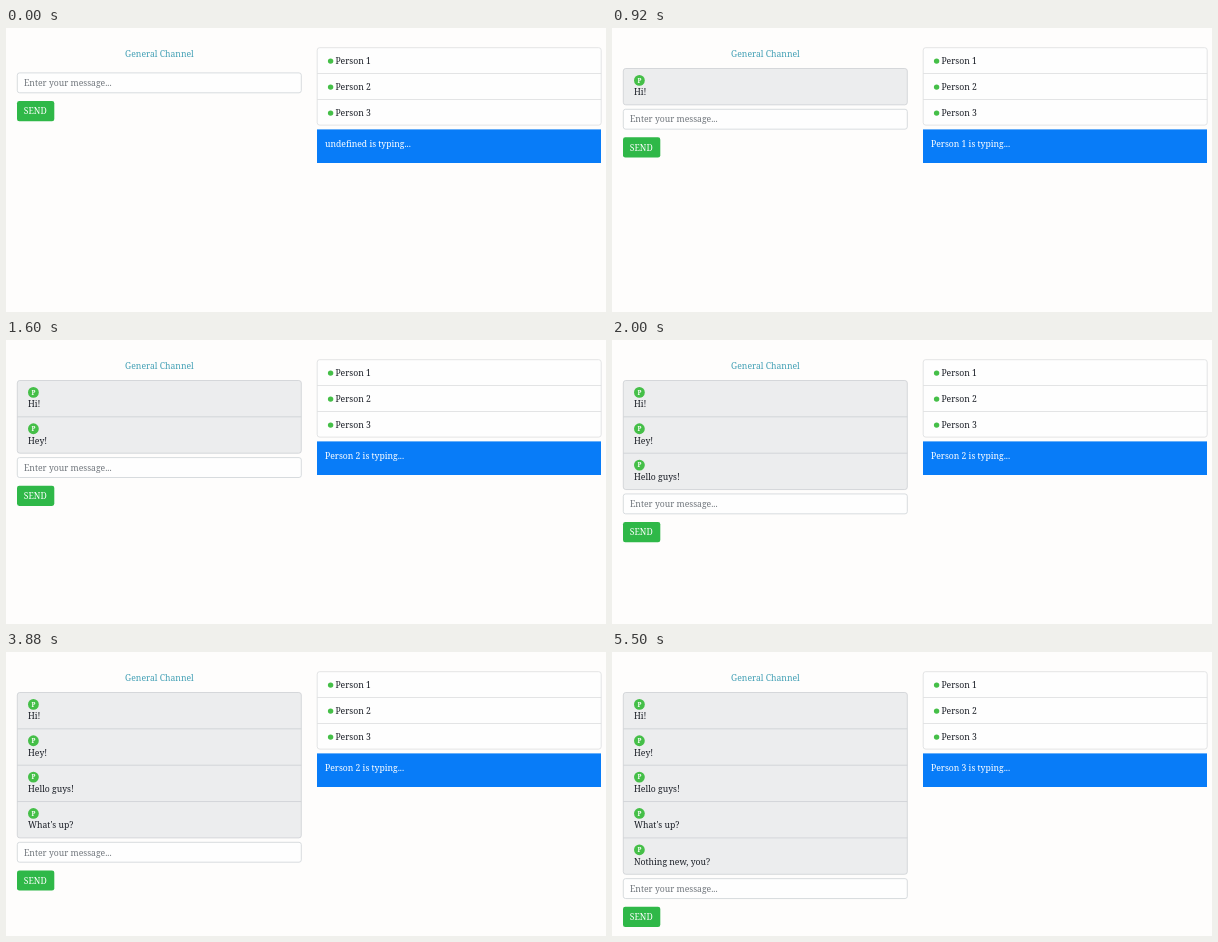
An HTML page with a canvas for the animation above (6000 ms loop, 600 by 284 pixels).

```html
<!DOCTYPE html>
<html lang="en">
<head>
<meta charset="utf-8">
<title>Group chat</title>
<style>
  html, body { margin: 0; width: 100%; height: 100%; overflow: hidden; background: #fefdfc; }
  canvas { display: block; width: 600px; height: 284px; }
</style>
</head>
<body>
<canvas id="stage"></canvas>
<script>
const W = 600, H = 284, LOOP = 6000;
const LEFT = 11, RIGHT = 311, COL = 284;
const LIST_TOP = 40.5, ROW = 36.35, PERSON_ROW = 26;

const messages = [
  { at: 460, text: "Hi!" },
  { at: 1160, text: "Hey!" },
  { at: 2000, text: "Hello guys!" },
  { at: 3360, text: "What's up?" },
  { at: 4820, text: "Nothing new, you?" }
];

// An empty name means nobody is typing and the banner collapses.
const typing = [
  [0, "undefined"], [300, "Person 1"], [480, ""], [520, "Person 2"],
  [920, "Person 1"], [1160, ""], [1180, "Person 1"], [1600, "Person 2"],
  [2100, "Person 3"], [2860, "Person 1"], [3800, "Person 2"], [5360, "Person 3"]
];

const canvas = document.getElementById("stage");
const ctx = canvas.getContext("2d");
const scale = window.devicePixelRatio || 1;
canvas.width = W * scale;
canvas.height = H * scale;
ctx.scale(scale, scale);

function text(str, x, y, color, { size = 8.65, weight = 400, align = "left" } = {}) {
  ctx.font = `${weight} ${size}px "Noto Serif", serif`;
  ctx.textAlign = align;
  ctx.fillStyle = color;
  ctx.fillText(str, x, y);
}

function box(x, y, w, h, radius, fill, stroke) {
  ctx.beginPath();
  ctx.roundRect(x, y, w, h, radius);
  ctx.fillStyle = fill;
  ctx.fill();
  if (stroke) {
    ctx.strokeStyle = stroke;
    ctx.lineWidth = 0.8;
    ctx.stroke();
  }
}

function dot(x, y, r) {
  ctx.beginPath();
  ctx.arc(x, y, r, 0, Math.PI * 2);
  ctx.fillStyle = "#45bf48";
  ctx.fill();
}

function divider(x, y, color) {
  ctx.beginPath();
  ctx.moveTo(x, y);
  ctx.lineTo(x + COL, y);
  ctx.strokeStyle = color;
  ctx.lineWidth = 0.8;
  ctx.stroke();
}

function drawPeople() {
  const top = 19.7;
  box(RIGHT + 0.2, top, COL, PERSON_ROW * 3 - 0.6, 2.5, "#fefefe", "#dcdddf");
  for (let i = 0; i < 3; i++) {
    const y = top + i * PERSON_ROW;
    if (i) divider(RIGHT + 0.2, y - 0.2, "#dcdddf");
    dot(324.6, y + 13.4, 2.7);
    text(`Person ${i + 1}`, 329.4, y + 16.3, "#1b1f27");
  }
}

function drawBanner(name) {
  ctx.fillStyle = "#087cf8";
  ctx.fillRect(RIGHT, 101.4, COL, name ? 33.6 : 15.8);
  if (name) text(`${name} is typing...`, 319, 119.2, "#fff", { weight: 500 });
}

function drawMessages(count) {
  if (!count) return;
  box(LEFT + 0.3, LIST_TOP, COL, ROW * count, 2.5, "#ecedee", "#cdd0d3");
  for (let i = 0; i < count; i++) {
    const y = LIST_TOP + i * ROW;
    if (i) divider(LEFT + 0.3, y, "#cdd0d3");
    dot(27.4, y + 11.9, 5.4);
    text("P", 27.4, y + 14.2, "#fff", { size: 6.2, weight: 700, align: "center" });
    text(messages[i].text, 22, y + 26.8, "#1b1f27");
  }
}

function drawForm(count) {
  const y = LIST_TOP + ROW * count + 4.4;
  box(LEFT + 0.3, y, COL, 19.9, 2.3, "#fefefe", "#cfd3d7");
  text("Enter your message...", 18, y + 13.2, "#70767c");
  box(LEFT, y + 28.1, 37.3, 20.2, 2.3, "#2fb848");
  text("SEND", 17.8, y + 41.5, "#fff", { weight: 500 });
}

function render(t) {
  const count = messages.filter(m => m.at <= t).length;
  const name = typing.filter(([at]) => at <= t).pop()[1];
  ctx.fillStyle = "#fefdfc";
  ctx.fillRect(0, 0, W, H);
  text("General Channel", 153.4, 29.2, "#43a0b5", { align: "center" });
  drawMessages(count);
  drawForm(count);
  drawPeople();
  drawBanner(name);
}

const start = performance.now();
function tick() {
  render((performance.now() - start) % LOOP);
  requestAnimationFrame(tick);
}
tick();
</script>
</body>
</html>
```
